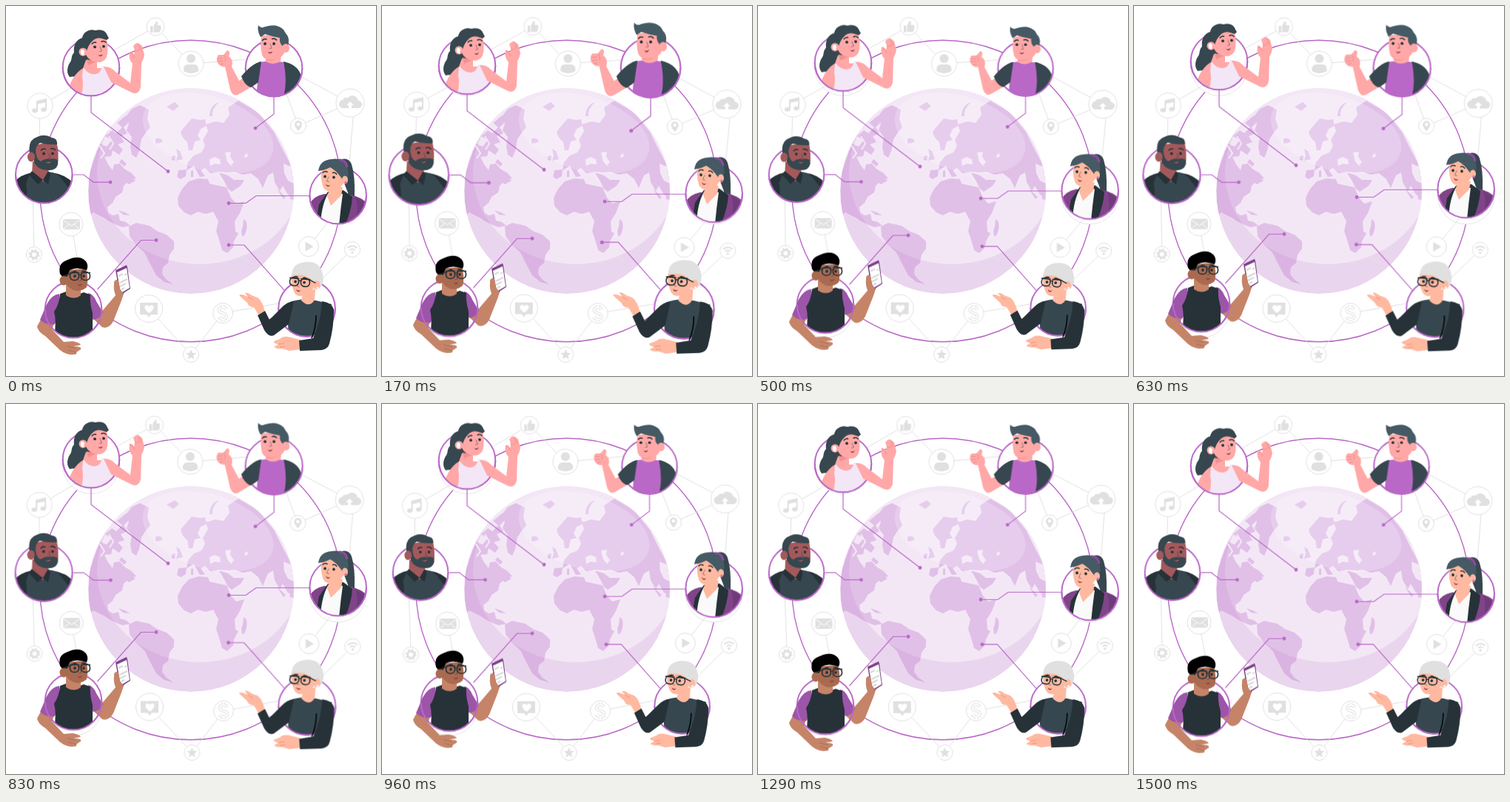
Write an HTML page that moves like this. It is 500 px wide and 500 px high and loops after 1540 ms.

```html
<!DOCTYPE html>
<html lang="en">
<head>
<meta charset="utf-8">
<title>Connected world</title>
<style>
html, body { margin: 0; width: 100%; height: 100%; overflow: hidden; background: #fff; }
svg { display: block; width: 100vw; height: 100vh; }
.wind, .float, .pulse { animation: 1540ms linear -41ms infinite; }
.wind { animation-name: wind; transform-origin: 255px 250px; }
.float { animation-name: float; }
.pulse { animation-name: pulse; }
@keyframes wind {
  0%, 100% { transform: rotate(-.1deg); }
  25% { transform: rotate(.9deg); }
  75% { transform: rotate(-1.1deg); }
}
@keyframes float {
  0%, 100% { transform: translateY(.5px); }
  50% { transform: translateY(-9.5px); }
}
@keyframes pulse {
  0%, 30%, 40%, 60%, 100% { transform: scale(.974); }
  10%, 50% { transform: scale(1.071); }
}
.line { fill: none; stroke: #ba68c8; stroke-width: 1.2; }
.dot, .purple { fill: #ba68c8; }
.rim { fill: none; stroke: #ba68c8; stroke-width: 2; }
.ghost { fill: #fff; stroke: #e6e6e6; }
.badge { fill: #fff; stroke: #e0e0e0; }
.icon { fill: #e0e0e0; }
.wire { fill: none; stroke: #e0e0e0; }
.ink { fill: #263238; }
.slate { fill: #37474f; }
.steel { fill: #455a64; }
.rose { fill: #ffa8a7; }
.blush { fill: #f28f8f; }
.umber { fill: #a3595b; }
.tan { fill: #c58468; }
.brown { fill: #a96a50; }
.peach { fill: #ffb9a0; }
.thin { fill: none; stroke: #263238; stroke-linecap: round; stroke-linejoin: round; }
</style>
</head>
<body>
<svg viewBox="0 0 500 500">
<defs>
  <path id="bowl" d="M-120-120H120V0H38.300A38.300 38.300 0 0 1-38.300 0H-120Z"/>
  <path id="arc" class="rim" d="M38.300 0A38.300 38.300 0 0 1-38.300 0"/>
  <circle id="disc" r="38.300" fill="#fff" stroke="#ba68c8" stroke-width="2"/>
  <g id="face">
    <circle class="ink" cx="-6" cy="0" r="1.900"/>
    <circle class="ink" cx="6" cy="0" r="1.900"/>
    <path class="thin" stroke-width="1.500" d="M-9.500-4.500Q-7-7.500-4-6M3.500-6.500Q7-8 9.500-5"/>
    <path class="thin" stroke-width=".8" opacity=".55" d="M1 0L3 6L0 6.500"/>
    <path fill="#8f3b42" d="M-2.500 10.500Q1 13 4 10Q3 14-.5 13Z"/>
  </g>
  <g id="specs" class="thin" stroke-width="1.600">
    <rect x="-13" y="-4.500" width="12" height="11" rx="5"/>
    <rect x="2" y="-4.500" width="12" height="11" rx="5"/>
    <path d="M-1-1H2M-13-3.500H-1M2-3.500H14"/>
  </g>
  <path id="dollar" d="M298 410q-1-3-5-3q-5 0-5 3.500t5 4.500t5 4.500t-5 3.500q-4 0-5-3M293 404v3M293 423v3"/>
  <clipPath id="globe"><circle cx="250" cy="250" r="139"/></clipPath>
  <clipPath id="c1"><use href="#bowl" x="115" y="83"/></clipPath>
  <clipPath id="c2"><use href="#bowl" x="362" y="84"/></clipPath>
  <clipPath id="c3"><use href="#bowl" x="51.300" y="228"/></clipPath>
  <clipPath id="c4"><use href="#bowl" x="448.700" y="256"/></clipPath>
  <clipPath id="c5"><use href="#bowl" x="91" y="410"/></clipPath>
  <clipPath id="c6"><use href="#bowl" x="406.500" y="408.500"/></clipPath>
</defs>

<circle class="line" cx="249.700" cy="250" r="203.800" style="stroke-width:1.400"/>

<g clip-path="url(#globe)">
  <circle cx="250" cy="250" r="139" fill="#ead5ee"/>
  <ellipse cx="262" cy="225" rx="139" ry="124" fill="#f3e7f6"/>
  <g fill="#ba68c8" opacity=".3">
    <path d="M170 139L181 134L193 140L191 152L195 164L189 171L183 180L180 196L176 205L170 201L168 190L170 177L163 168L166 159L160 152Z"/>
    <path d="M162 148L150 158L157 164L149 172L143 168L134 176L143 181L136 190L127 186L119 208L112 228L111 285L118 279L132 286L143 293L157 299L168 297L162 292L154 290L152 281L144 283L138 279L137 272L144 266L148 258L157 252L159 243L167 235L176 233L170 226L160 220L154 213L146 214L144 222L138 214L133 204L142 203L144 195L153 201L158 194L151 187L160 184L155 176L164 172L159 164L167 156Z"/>
    <path d="M152 276L161 279L168 283L158 282ZM156 207L163 213L160 217L153 211ZM158 235L171 233L175 236L166 241Z"/>
    <path d="M166 298L176 293L194 297L204 304L217 309L227 318L227 328L221 336L219 347L212 353L211 362L217 370L226 376L214 373L203 364L195 349L187 333L175 322L167 311Z"/>
    <path d="M247 237L260 233L273 234L275 240L288 243L298 245L304 259L311 267L322 264L316 280L309 291L310 305L314 307L308 318L307 326L299 334L292 330L288 316L284 304L287 291L280 278L270 281L259 278L250 283L241 279L233 270L232 259L238 247Z"/>
    <path d="M321 288Q327 290 325 302Q322 314 319 310Q317 304 320 298Z"/>
    <path d="M288 225L300 229L308 235L322 235L317 243L305 251L300 247L295 237Z"/>
    <path d="M233 222L244 221L243 230L236 234L231 231ZM230 193L235 196L239 207L230 209L232 202ZM224 203L229 202L228 209L224 208Z"/>
    <path d="M239 178L236 170L243 161L251 152L262 154L269 153L271 162L263 166L259 175L263 181L255 183L252 195L247 195L245 184Z"/>
    <path d="M244 222L246 211L254 202L264 198L269 189L266 181L273 169L270 160L283 156L294 158L302 147L300 137L314 128L340 143L362 170L375 196L389 222L389 258L381 255L374 243L370 250L363 238L361 225L354 229L347 246L341 234L331 226L320 228L309 224L301 225L288 224L276 226L269 219L263 222L269 230L262 231L254 216Z"/>
    <path d="M275 149Q275 134 288 130Q278 138 279 149ZM202 180Q207 176 212 182Q208 187 202 185ZM217 136L228 130L234 135L226 142ZM250 223L253 222L253 231L250 231ZM366 247L378 258L375 261ZM383 252L389 250V262L384 261Z"/>
  </g>
  <g fill="#f3e7f6">
    <path d="M275 207L282 204L289 207L290 214L282 213L276 216ZM296 198L304 197L303 204L308 211L304 216L299 210ZM322 202L326 199L327 203L323 205ZM375 213L385 217L389 240L381 236L376 226Z"/>
    <path fill="none" stroke="#f3e7f6" stroke-width="2" d="M126 188L133 199L128 206M139 176L145 186L140 194"/>
  </g>
  <ellipse cx="273" cy="172" rx="91" ry="50" transform="rotate(17 273 172)" fill="#fff" opacity=".2"/>
</g>

<circle class="ghost" cx="115" cy="83" r="38.300"/>
<circle class="ghost" cx="448.700" cy="256.500" r="38.300"/>
<circle class="ghost" cx="91" cy="410" r="38.300"/>

<g class="wind">
  <path class="wire" d="M46 135L112 97M135 66L202 28L250 78L340 71M385 88L465 131L395 162L374 105M470 140L462 235M440 286L409 325M468 329L415 380M293 415L385 399M193 409L250 471L293 415M88 295L98 350M38 336L36 240M46 135L45 180"/>
  <g class="badge">
    <circle cx="202" cy="28" r="12"/><circle cx="250" cy="78" r="17"/>
    <circle cx="465" cy="131" r="19"/><circle cx="395" cy="162" r="10.500"/>
    <circle cx="46" cy="135" r="17"/><circle cx="88" cy="295" r="16"/>
    <circle cx="38" cy="336" r="10.500"/><circle cx="193" cy="409" r="18.500"/>
    <circle cx="293" cy="415" r="13.500"/><circle cx="250" cy="471" r="10.500"/>
    <circle cx="409" cy="325" r="13.500"/><circle cx="468" cy="329" r="10.500"/>
  </g>
  <g class="icon">
    <path d="M195 27h3.500v9h-3.500zM199.500 27L203 20.500q3 .5 1.500 5.500h4.500q1.500 5-1.500 9.500h-8z"/>
    <circle cx="250" cy="71" r="6"/><path d="M240 88q-1-9 6-9h8q7 0 6 9q-10 6-20 0z"/>
    <path d="M456 138a5.500 5.500 0 0 1-1-11a6 6 0 0 1 7-3a8 8 0 0 1 14 4a5 5 0 0 1 0 10z"/>
    <path d="M465 129l-5 5h3v6h4v-6h3z" fill="#fff"/>
    <path fill-rule="evenodd" d="M395 169q-5-6-5-9a5 5 0 0 1 10 0q0 3-5 9zM395 157.500a2.300 2.300 0 1 0 .01 0z"/>
    <path d="M41 128l14-3v15a4 3 0 1 1-2-2.600v-7l-10 2v9a4 3 0 1 1-2-2.600z"/>
    <rect x="77" y="288" width="23" height="14" rx="1"/>
    <path d="M77 289l11.500 8L100 289M77 302l8-7M100 302l-8-7" fill="none" stroke="#fff"/>
    <circle cx="38" cy="336" r="4.500" fill="none" stroke="#e0e0e0" stroke-width="3"/>
    <circle cx="38" cy="336" r="6.500" fill="none" stroke="#e0e0e0" stroke-width="2" stroke-dasharray="2.600 2.500"/>
    <path d="M181 401h24v16h-9l-3 4l-3-4h-9z"/>
    <path d="M193.500 415q-7-5-6-8.500q2.500-4 6-.5q3.500-3.500 6 .5q1 3.500-6 8.500z" fill="#fff"/>
    <use href="#dollar" fill="none" stroke="#e0e0e0" stroke-width="4"/>
    <use href="#dollar" fill="none" stroke="#fff" stroke-width="2"/>
    <path d="M250 464l2 4.700l5 .4l-3.800 3.300l1.200 5l-4.400-2.700l-4.400 2.700l1.200-5l-3.800-3.300l5-.4z"/>
    <path d="M404.500 318.500l11 6.500l-11 6.500z"/>
    <circle cx="468" cy="333" r="1.700"/>
    <path d="M464.500 330q3.500-3 7 0M461.500 327q6.500-5.500 13 0" fill="none" stroke="#e0e0e0" stroke-width="1.800"/>
  </g>
</g>

<!-- woman waving -->
<g class="float">
  <path class="line" d="M115 122V144L219 223.500"/><circle class="dot" cx="219" cy="223.500" r="2.400"/>
  <use href="#disc" x="115" y="83"/>
  <path class="slate" d="M138 43C136 32 127 31 121 33C112 30 104 36 103 43C93 46 91 56 92 63C87 68 90 73 86 77C82 84 82 91 86 96C95 94 103 97 108 88L115 77Z"/>
  <g clip-path="url(#c1)">
    <path class="rose" d="M108 73L123 74L123 84L138 84L155 101L146 124H82Q86 95 104 84Z"/>
    <path fill="#f3e6f6" d="M104 85Q106 83 107 86Q113 93 121 92Q128 91 130 81L134 82Q136 90 144 98L147 125H100Q106 110 103 96Z"/>
  </g>
  <use href="#arc" x="115" y="83"/>
  <path class="rose" d="M132 82Q141 81 148 89L168 104L171 78Q165 72 167 62Q170 61 173 66L174 60L172 54Q177 48 180 51L184 54L187 66Q186 72 183 77L182 110Q179 121 170 117L142 103Z"/>
  <path fill="none" stroke="#e98a8a" stroke-width=".8" d="M168 63Q173 65 174 70M174 60Q177 63 181 58M179 52L183 60"/>
  <path class="blush" d="M109 72L123 75L111 80Z"/>
  <path class="rose" d="M109 50Q113 42 124 41L136 45Q139 59 136 69Q132 77 123 76Q112 74 108 66Z"/>
  <path class="slate" d="M105 41Q119 30 134 37L139 43Q137 47 133 45Q124 41 118 46Q110 53 108 65L101 62Z"/>
  <circle class="rose" cx="104" cy="62" r="5.500"/><path d="M101 60q3-3 5 1l-1 6q-5-1-4-7z" fill="#fff"/>
  <use href="#face" transform="translate(126 55) rotate(-4)"/>
</g>

<!-- man with thumb up -->
<g class="pulse" style="transform-origin:343px 96px">
  <path class="line" d="M362 123V146L337 165"/><circle class="dot" cx="337" cy="165" r="2.400"/>
  <use href="#disc" x="362" y="84"/>
  <path class="rose" d="M327 93L315 101L305 82Q308 73 301 68Q304 61 299 60L294 66L287 66Q283 71 286 77Q290 83 296 82L303 113Q307 124 315 119L339 105Z"/>
  <path fill="none" stroke="#e98a8a" stroke-width=".8" d="M287 71l6-1M287 75l6-1M289 79l5-1M294 66Q298 69 296 75"/>
  <g clip-path="url(#c2)">
    <path class="purple" d="M342 76Q355 73 377 76L384 126H338Z"/>
    <path class="slate" d="M375 75Q393 79 398 92L401 125H374Q381 105 375 75Z"/>
  </g>
  <use href="#arc" x="362" y="84"/>
  <path class="slate" d="M345 75Q333 77 318 95Q322 107 331 110L341 103Z"/>
  <path class="rose" d="M350 65H372L371 75Q360 81 351 75Z"/>
  <path class="blush" d="M351 70Q362 73 370 64Q366 76 352 73Z"/>
  <path class="rose" d="M345 40L372 38L377 52Q379 68 366 71Q350 76 346 66Q343 54 345 40Z"/>
  <path class="steel" d="M344 42Q339 33 341 26Q344 31 350 28Q366 23 375 32L378 37Q384 43 381 53L375 55Q369 51 370 43Q359 41 350 38Z"/>
  <ellipse class="rose" cx="378" cy="57" rx="5" ry="6"/>
  <use href="#face" transform="translate(356 51)"/>
</g>

<!-- man with beard -->
<g class="pulse" style="transform-origin:78px 221px">
  <path class="line" d="M91 228H105L118 238H141"/><circle class="dot" cx="141" cy="238" r="2.400"/>
  <use href="#disc" x="51.300" y="228"/>
  <g clip-path="url(#c3)">
    <path class="ink" d="M12 237Q20 228 35 225H62Q82 228 91 240V270H10Z"/>
    <path class="slate" d="M32 226L58 224Q71 226 76 235L84 245L80 270H26Q30 252 27 240Z"/>
  </g>
  <use href="#arc" x="51.300" y="228"/>
  <path class="umber" d="M36 210L58 213L57 228L50 238L35 227Z"/>
  <path class="ink" d="M35 223L50 235L43 241L31 228ZM57 223L60 228L57 241L50 235Z"/>
  <path class="umber" d="M37 188L68 183Q72 198 70 214Q60 222 47 218L37 206Z"/>
  <path class="slate" d="M36 196L40 196Q41 208 47 210Q53 205 59 207Q65 205 70 208L70 214Q68 222 58 222Q43 222 38 211Z"/>
  <path class="slate" d="M32 199Q29 181 42 177Q52 172 62 178Q70 179 69 187Q56 188 46 185Q40 188 40 198L35 203Z"/>
  <ellipse class="umber" cx="34" cy="204" rx="5" ry="6.500"/>
  <use href="#face" transform="translate(57 199.500)"/>
  <path fill="#cf8c88" d="M53 211q4 2 7-1q-2 4-7 1z"/>
</g>

<!-- woman with ponytail -->
<g class="float">
  <path class="line" d="M410 256.500H338L324 266.500H301"/><circle class="dot" cx="301" cy="266.500" r="2.400"/>
  <use href="#disc" x="448.700" y="256"/>
  <path class="slate" d="M450 208Q463 203 467 214Q472 230 471 257L465 261Q458 240 450 224Z"/>
  <g clip-path="url(#c4)">
    <path fill="#804489" d="M430 254Q415 257 410 268V297H492V270Q480 257 464 255Z"/>
    <path fill="#6f3b7c" d="M472 258Q486 264 490 275L482 297H470Q478 276 472 258Z"/>
    <path class="ink" d="M435 251L423 268L418 297H458Q467 276 468 258L456 249Z"/>
    <path fill="#fafafa" d="M436 252Q426 268 425 297H450Q452 275 455 254Z"/>
    <path class="peach" d="M439 243L455 245L453 256L439 270L434 257Z"/>
  </g>
  <use href="#arc" x="448.700" y="256"/>
  <path class="peach" d="M427 218L452 216L458 231Q457 245 444 249Q431 253 428 243Q424 230 427 218Z"/>
  <path class="steel" d="M422 223Q424 208 440 207Q457 204 462 220Q464 235 458 240L453 232Q446 222 438 218Q431 222 422 223Z"/>
  <path d="M450 208Q460 208 461 218" fill="none" stroke="#8e4a9b" stroke-width="3"/>
  <ellipse class="peach" cx="458" cy="235" rx="4" ry="5.500"/>
  <circle class="purple" cx="459" cy="238.500" r="1.500"/>
  <use href="#face" transform="translate(437 231) scale(-1 1) rotate(-5)"/>
</g>

<!-- man with phone -->
<g class="float">
  <path class="line" d="M123.500 383L182.500 316.500H203"/><circle class="dot" cx="203" cy="316.500" r="2.400"/>
  <use href="#disc" x="91" y="410"/>
  <path class="tan" d="M48 422L42 433Q43 440 53 446L73 465Q82 472 91 471Q97 471 95 468L101 464Q103 460 91 460L101 458Q100 455 90 453L78 454L62 437L66 427Z"/>
  <path fill="none" stroke="#a96a50" stroke-width=".8" d="M83 460L95 463M84 465L95 468"/>
  <path class="tan" d="M118 413L131 411L148 391Q144 380 147 372L153 367L160 386L156 398L145 426Q139 437 130 434L116 421Z"/>
  <path fill="#9c55a9" d="M72 389Q62 390 55 403L46 424Q54 432 66 430L74 413ZM111 388Q118 389 122 399L131 414Q128 422 118 424L108 410Z"/>
  <g clip-path="url(#c5)">
    <path class="ink" d="M73 389L81 386Q93 393 105 387L114 390Q113 401 117 415V452H64Q69 428 65 413Q72 403 73 389Z"/>
  </g>
  <use href="#arc" x="91" y="410"/>
  <path class="tan" d="M81 374L101 382L101 391Q92 398 81 391Z"/>
  <path class="brown" d="M80 357L108 355Q112 368 109 380Q101 387 91 384Q81 380 78 366Z"/>
  <path d="M73 362Q70 348 81 344Q99 335 108 345Q112 351 109 357Q95 352 86 357L83 365L77 367Z"/>
  <ellipse class="brown" cx="78" cy="371" rx="5.500" ry="6.500"/>
  <use href="#face" transform="translate(99 365)"/>
  <use href="#specs" transform="translate(99.500 364)"/>
  <path class="thin" stroke-width="1.400" d="M86 362L78 365"/>
  <path fill="#7d438a" d="M148 357L163 350L164 353L168 382L154 391Z"/>
  <path fill="#fff" d="M150 360L163 354L167 381L155 388Z"/>
  <path fill="none" stroke="#d8d8d8" stroke-width="2" d="M152 365L158 362M154 374L164 369M154 379L162 375M156 383L160 381M160 364L163 362"/>
  <path class="tan" d="M146 373Q147 369 152 371L154 382L158 388L153 394Q145 388 146 373Z"/>
</g>

<!-- older woman -->
<g class="pulse" style="transform-origin:372px 394px">
  <path class="line" d="M376 384L322 323H301"/><circle class="dot" cx="301" cy="323" r="2.400"/>
  <use href="#disc" x="406.500" y="408.500"/>
  <path class="peach" d="M341 417L335 407Q328 407 326 401L316 392Q314 389 320 390L327 393L323 388Q326 386 332 391L340 394Q347 399 350 414Z"/>
  <path class="peach" d="M398 451L381 447Q374 446 370 450L362 453Q361 456 368 457L362 461Q367 464 373 463L383 466L398 464Z"/>
  <path fill="none" stroke="#e58f79" stroke-width=".8" d="M327 393L334 397M368 457L376 456M370 461L377 460"/>
  <g clip-path="url(#c6)">
    <path class="slate" d="M384 400Q398 394 419 398L440 403L432 452H380Q384 425 376 414Z"/>
  </g>
  <use href="#arc" x="406.500" y="408.500"/>
  <path class="ink" d="M389 399Q380 399 371 409L356 424L350 412L340 418L349 438Q355 448 362 445L382 430Z"/>
  <path class="ink" d="M427 399Q441 401 443 411Q443 434 437 456Q435 464 426 465L397 466L396 452L415 449Q426 424 427 399Z"/>
  <path d="M419 418Q419 434 413 449" fill="none" stroke="#000" stroke-width="1.500"/>
  <path class="peach" d="M402 384L418 383L417 397Q410 409 399 398Z"/>
  <path fill="#e0e0e0" d="M386 364Q386 348 404 346Q424 344 428 362Q431 374 423 382L412 383Z"/>
  <path class="peach" d="M386 363L409 361L417 372Q417 386 403 391Q391 395 388 383Q384 373 386 363Z"/>
  <path fill="#e0e0e0" d="M386 364Q390 356 407 358L419 363L423 374Q417 378 414 371Q405 361 386 364Z"/>
  <ellipse class="peach" cx="420" cy="377" rx="4.500" ry="6"/>
  <circle cx="421" cy="381" r="1.500" fill="#fff"/>
  <use href="#face" transform="translate(397 373) scale(-1 1) rotate(-5)"/>
  <use href="#specs" transform="translate(396.500 372) rotate(5)"/>
  <path class="thin" stroke-width="1.400" d="M410 370L418 374"/>
</g>
</svg>
</body>
</html>
```
